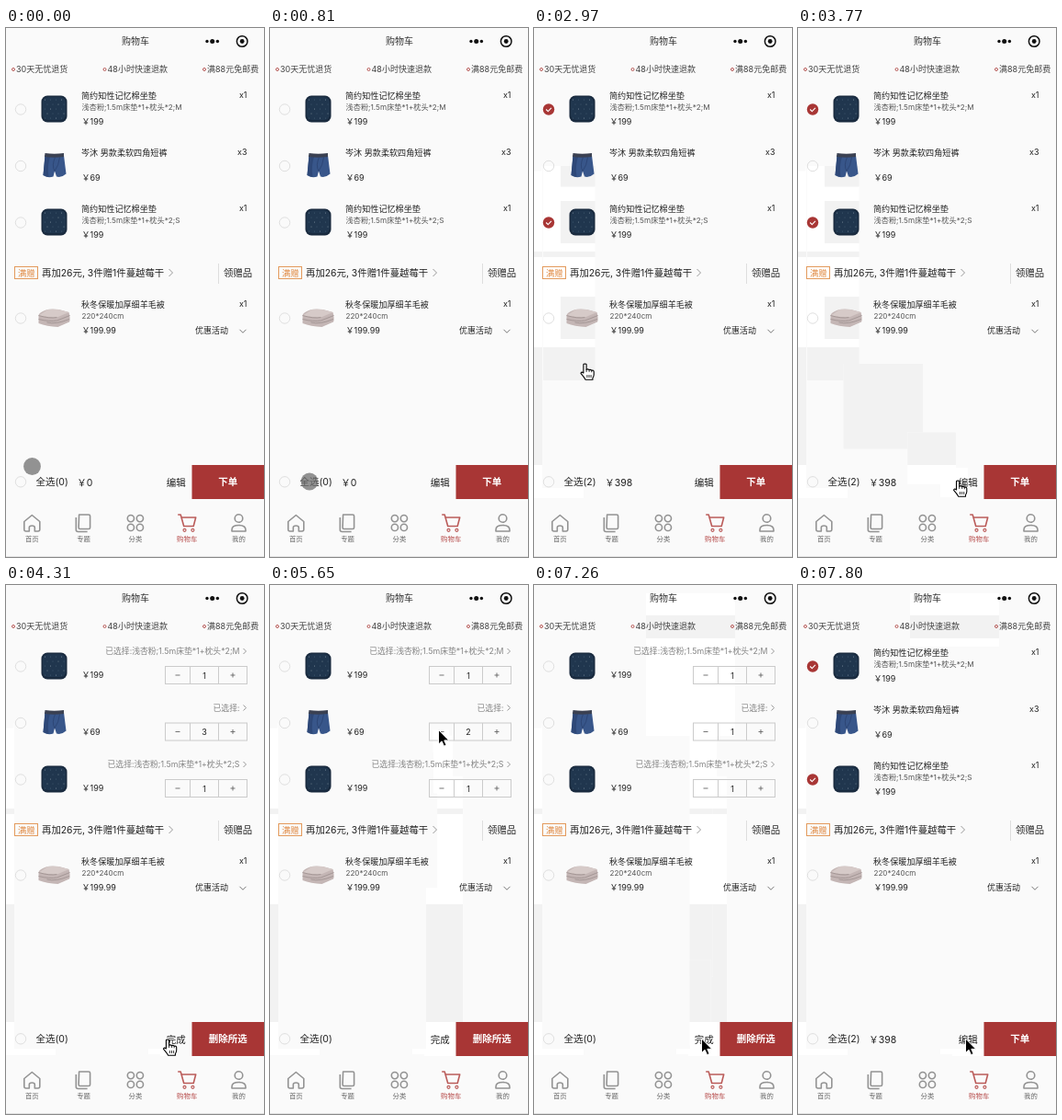
These frames come from a looping animation (281x575 px, 8 s). An HTML page:

```html
<!DOCTYPE html>
<html lang="zh-CN">
<head>
<meta charset="utf-8">
<style>
html, body { margin: 0; width: 100%; height: 100%; overflow: hidden; background: #fafafa; }
svg { display: block; }
#stage { width: 100%; height: 100%; }
text {
  font-family: Inter, "Noto Sans CJK SC", "Noto Sans CJK", sans-serif;
  font-feature-settings: "calt" 0;
  white-space: pre;
}
</style>
</head>
<body>
<svg id="stage" viewBox="0 0 281 575"></svg>
<script>
const LOOP = 8000, BEAT = 268.8;
const RED = '#a83635', INK = '#222', GREY = '#939393', PAPER = '#fafafa';
const stage = document.getElementById('stage');

// all times below are in beats
const SELECT = 4, UNSELECT = 10, EDIT = 16, LESS = 21, LEAST = 23, DONE = 29;
const START = [28.5, 476.5];

// pointer moves: from beat, to beat, x, y
const MOVES = [
  [0, 2, 43, 493], [6, 7, 4.5, 195.5], [7, 9, 16, 150], [10, 11, 55.5, 365], [11, 15, 176, 494],
  [16, 17, 199, 329], [17, 20, 183.5, 157.5], [24, 25, 175.5, 407.5], [25, 27, 182.5, 493]
];

const ITEMS = [
  { name: '简约知性记忆棉坐垫', spec: '浅杏粉;1.5m床垫*1+枕头*2;M', price: 199, count: 1, art: cushion },
  { name: '岑沐 男款柔软四角短裤', spec: '', price: 69, count: 3, art: boxers },
  { name: '简约知性记忆棉坐垫', spec: '浅杏粉;1.5m床垫*1+枕头*2;S', price: 199, count: 1, art: cushion }
];
const rowY = i => 88 + 61.5 * i;

// y is the vertical centre of the line
const text = (x, y, s, size = 9, fill = INK, extra = '') =>
  `<text x="${x}" y="${y + size * .37}" font-size="${size}" fill="${fill}" ${extra}>${s}</text>`;
const mid = (x, y, s, size, fill, extra = '') => text(x, y, s, size, fill, 'text-anchor="middle" ' + extra);
const end = (x, y, s, size, fill) => text(x, y, s, size, fill, 'text-anchor="end"');
const rect = (x, y, w, h, fill, extra = '') =>
  `<rect x="${x}" y="${y}" width="${w}" height="${h}" fill="${fill}" ${extra}/>`;
const dot = (x, y, r, fill, extra = '') => `<circle cx="${x}" cy="${y}" r="${r}" fill="${fill}" ${extra}/>`;
const ring = (x, y, r, stroke, w) => dot(x, y, r, 'none', `stroke="${stroke}" stroke-width="${w}"`);
const shape = (d, fill, extra = '') => `<path d="${d}" fill="${fill}" ${extra}/>`;
const line = (d, stroke, w = 1) =>
  shape(d, 'none', `stroke="${stroke}" stroke-width="${w}" stroke-linejoin="round"`);
const at = (x, y, s) => `<g transform="translate(${x} ${y})">${s}</g>`;
const chevron = (x, y, h = 3) => line(`M${x} ${y - h}l${h} ${h}l${-h} ${h}`, '#999');

function radio(y, on) {
  return on
    ? dot(16, y, 6.2, RED) + line(`M13.2 ${y}l2.1 2.1l3.6-3.8`, '#fff', 1.1)
    : ring(16, y, 5.7, '#dcdcdc', .9);
}

function cushion() {
  let s = rect(-14, -14.5, 28, 29, '#1a2b3f', 'rx="6.5"') + rect(-12.5, -13, 25, 25, '#20364e', 'rx="6"');
  for (let i = 0; i < 20; i++) {
    const r = Math.floor(i / 4);
    s += dot(-10 + i % 4 * 6 + r % 2 * 2.5, -10 + r * 5, .5, i % 3 ? '#466078' : '#8597a6');
  }
  return s;
}

function boxers() {
  return shape('M-10-11H10.5L13 9Q8 13.5 2.5 12L.5 6L-1 12Q-7 14-12 10.5Z', '#38568a') +
    shape('M-10-11L-12 10.5L-6 12.5Q-8 0-4-11Z', '#2e4878') +
    shape('M-10-13.5Q0-12 10.5-13.5V-9.5Q0-8-10.5-9.5Z', '#3b4152') +
    line('M1-9Q-3 0 .5 6Q5 0 6-9', '#2a4270', .8);
}

function blanket() {
  return shape('M-17-3Q-17-6-9-9Q-4-10.5 5-9.5L16-6.5Q18 1 16.5 4L4 9.5Q-8 9-17 5.5Z', '#c4b6b5') +
    shape('M-17-3L-7-9.5L5-9.5L16-6.5L3-1Q-8-1-17-3Z', '#d6cac8') +
    line('M-17 1Q-5 4 3 2.5L17-3M-17-3Q-5 .5 3-1M-8 4.5Q2 7 16.5 1', '#a19392', .9);
}

function stepper(y, n) {
  return rect(173.5, y, 89, 19, 'none', 'stroke="#cbcbcb"') +
    line(`M200.5 ${y}v19M231.5 ${y}v19`, '#cbcbcb') +
    line(`M184.5 ${y + 9.5}h5M244.5 ${y + 9.5}h5M247 ${y + 7}v5`, '#666', .9) +
    mid(216, y + 9.7, n, 9);
}

function pointerAt(beat) {
  return MOVES.reduce(([px, py], [from, to, x, y]) => {
    const k = Math.min(1, Math.max(0, (beat - from) / (to - from)));
    const e = 1 - (1 - k) ** 3;
    return [px + (x - px) * e, py + (y - py) * e];
  }, START);
}

function cleanPage() {
  const band = (y, h) => rect(0, y, 281, h, '#f2f2f2');
  const tile = y => rect(29, y - 23, 46, 46, '#f2f2f2');
  return rect(0, 0, 281, 575, '#fff') + band(33, 25) + band(243, 6) + band(347, 128) +
    tile(rowY(1)) + tile(rowY(2)) + tile(315);
}

// a moving pointer uncovers the clean page, each redraw of the list covers it again
function background(beat) {
  const fresh = (x, y, w, h) =>
    `<svg x="${x}" y="${y}" width="${w}" height="${h}" viewBox="${x} ${y} ${w} ${h}">${cleanPage()}</svg>`;
  let s = rect(0, 0, 281, 575, PAPER);
  for (let b = SELECT + 1; b <= beat; b++) {
    const [ax, ay] = pointerAt(b - 1), [bx, by] = pointerAt(b);
    if (ax !== bx) s += fresh(Math.min(ax, bx) - 6, Math.min(ay, by), Math.abs(ax - bx) + 17, Math.abs(ay - by) + 18);
    if (b === LEAST) s += fresh(122, 9, 97, 155);
    if (b === UNSELECT) s += rect(9, 143, 97, 357, PAPER);
    if (b === EDIT || b === DONE) s += rect(9, 67, 254, 437, PAPER);
  }
  return s + rect(0, 574, 281, 1, '#e2e2e2');
}

function header() {
  const promo = (x, s) => ring(x, 45, 1.5, '#b04a47', .9) + text(x + 3, 45, s, 9, '#444');
  return mid(141, 14.5, '购物车', 10, '#333') +
    [-1, 0, 1].map(i => dot(224.7 + i * 5.7, 14.5, i ? 1.7 : 2.5, '#111')).join('') +
    ring(257.2, 14.5, 5.8, '#111', 1.5) + dot(257.2, 14.5, 2.4, '#111') +
    promo(8, '30天无忧退货') + promo(107.5, '48小时快速退款') + promo(216, '满88元免邮费');
}

function item(it, y, edit, checked, count) {
  const s = radio(y + .5, checked) + at(52.5, y, it.art());
  if (edit) {
    return s + end(254.5, y - 16, '已选择:' + it.spec, 8.8, '#858585') + chevron(258.5, y - 16) +
      text(82.5, y + 9.7, '￥' + it.price) + stepper(y + .5, count);
  }
  return s + text(82, y - 14.2, it.name, 9.1) + text(82.5, y - 2, it.spec, 8.2, '#555') +
    text(82.5, y + 13.2, '￥' + it.price) + end(262.5, y - 15, 'x' + it.count);
}

function offer() {
  return rect(9.5, 259.5, 25, 13, 'none', 'stroke="#e39a5c"') + mid(22.3, 266.2, '满赠', 9.3, '#e08a43') +
    text(39, 266, '再加26元, 3件赠1件蔓越莓干', 10.4) + chevron(177.5, 266, 4) +
    line('M231.5 256V278', '#dedede') + text(237, 266.3, '领赠品', 10.4) +
    radio(315.5, false) + at(52.5, 315.5, blanket()) +
    text(82, 301, '秋冬保暖加厚细羊毛被', 9.1) + text(82.5, 313, '220*240cm', 8.1, '#555') +
    text(82.5, 328.5, '￥199.99') + end(262.5, 300, 'x1') +
    text(206, 328.5, '优惠活动') + line('M254.5 327.8l3.5 3.5l3.5-3.5', '#777');
}

function bar(edit, picked) {
  const sum = f => picked.reduce((n, i) => n + f(ITEMS[i]), 0);
  const count = sum(it => it.count), total = sum(it => it.count * it.price);
  return radio(493.3, picked.length === 3) + text(32.5, 493, `全选(${count})`, 10.5) +
    (edit ? '' : text(77.2, 494, '￥' + total, 10.5)) +
    text(174.8, 494, edit ? '完成' : '编辑', 10.5) +
    rect(202.5, 475, 79, 37, RED) +
    mid(241.7, 493.5, edit ? '删除所选' : '下单', 10.5, '#fff', 'font-weight="700"');
}

function tabs() {
  const pink = '#bb5c5a';
  const tab = (i, label, icon, color = '#666') =>
    at(28.3 + 56.3 * i, 538, icon) + mid(28.3 + 56.3 * i, 555.5, label, 7.4, color);
  const icon = (d, c = GREY) => line(d, c, 1.6);
  const petals = [-1, 1].map(x => [-1, 1].map(y => ring(x * 5, y * 4.9, 3.6, GREY, 1.6)).join('')).join('');
  return tab(0, '首页', icon('M-8.5-1.5L0-8.5L8.5-1.5V7Q8.5 9 6.5 9H3V5Q3 3 0 3T-3 5V9H-6.5Q-8.5 9-8.5 7Z')) +
    tab(1, '专题', icon('M-5-9H5.5Q7 -9 7-7.5V5Q7 6.5 5.5 6.5H-4Q-5.5 6.5-5.5 5ZM-8.3-6V7.5Q-8.3 9.5-6 9.5H4')) +
    tab(2, '分类', petals) +
    tab(3, '购物车', icon('M-10-9H-7L-3.5 3.5H7L9.5-6H-6', pink) +
      ring(-2.7, 7.8, 1.5, pink, 1.2) + ring(6.2, 7.8, 1.5, pink, 1.2), '#b64b4a') +
    tab(4, '我的', ring(0, -5, 4.3, GREY, 1.6) + icon('M-7.5 9V7.5Q-7.5 2.5 0 2.5T7.5 7.5V9Z'));
}

function pointer(beat) {
  const [x, y] = pointerAt(beat);
  if (beat < SELECT) return dot(x, y, 9.4, '#6f6f6f', 'opacity=".75"');
  if (beat <= EDIT) return at(x, y,
    shape('M-1.6 10V1.2Q-1.6 0 0 0T1.6 1.2V6.3Q3 5.2 4.6 6.6Q6 5.9 7.2 7.2Q9.5 6.8 9.7 8.6V12Q9.5 14 8.4 15.5V17.3H.6Q-1 14.3-4.5 10.4Q-4 8-1.6 10Z',
      '#fff', 'stroke="#000" stroke-width="1.1" stroke-linejoin="round"') +
    line('M1.6 6V9M4.6 6.6V9M7.2 7.2V9.3M2.4 12V15M4.5 12V15M6.6 12V15', '#000', .8));
  return at(x, y, shape('M0 0V15.6L3.6 12.3L6 17.7L8.6 16.6L6.3 11.4H11.3Z', '#000',
    'stroke="#fff" stroke-width="1" stroke-linejoin="round"'));
}

function draw(beat) {
  const edit = beat >= EDIT && beat < DONE;
  const picked = edit || beat < SELECT ? [] : beat < UNSELECT ? [0, 1, 2] : [0, 2];
  const taken = (beat >= LESS) + (beat >= LEAST);
  const rows = ITEMS.map((it, i) =>
    item(it, rowY(i), edit, picked.includes(i), i === 1 ? it.count - taken : it.count));
  stage.innerHTML = background(beat) + header() + rows.join('') + offer() +
    bar(edit, picked) + tabs() + pointer(beat);
}

let shown = -1;
function tick() {
  const beat = Math.floor(performance.now() % LOOP / BEAT);
  if (beat !== shown) draw(shown = beat);
  requestAnimationFrame(tick);
}
tick();
</script>
</body>
</html>
```
